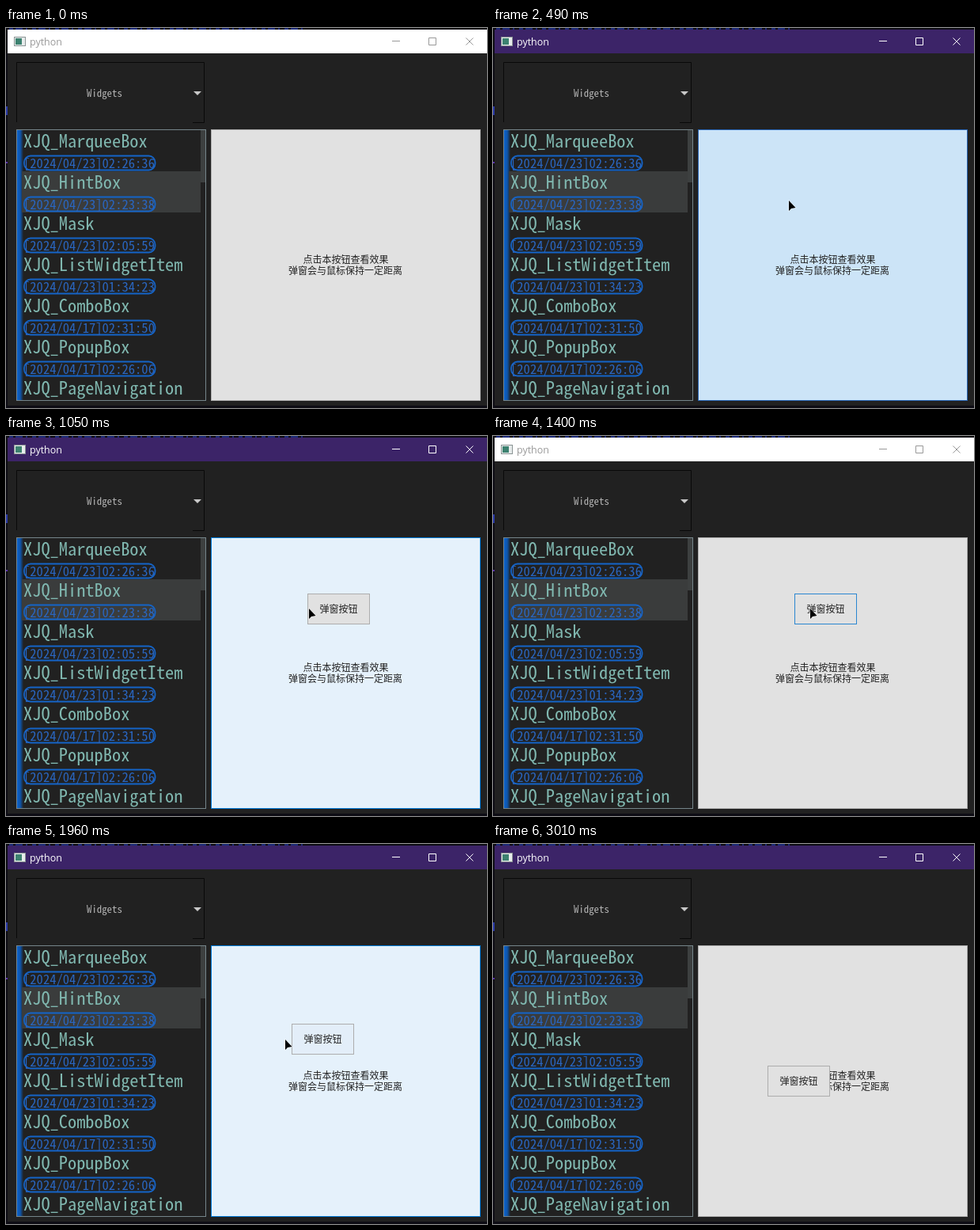
Recreate the animation shown at these times as an HTML page. Size 608x480 px, loop 3.08 s.

```html
<!DOCTYPE html>
<html lang="zh-CN">
<head>
<meta charset="utf-8">
<title>python</title>
<style>
html, body { margin: 0; width: 608px; height: 480px; overflow: hidden; background: #0d0c14; }
svg { display: block; }
/* half-width Latin: every glyph advances half an em */
.mono {
  font-family: "Noto Sans Mono CJK SC", "Liberation Mono", monospace;
  font-size-adjust: ch-width .5;
  white-space: pre;
}
.cjk { font: 12px "Noto Sans CJK SC", "Noto Sans CJK", sans-serif; text-anchor: middle; fill: #222; }
.title { font: 12.5px "Open Sans", sans-serif; }
.name { font-size: 22.4px; fill: #80b8b0; }
.date { font-size: 16.6px; fill: #2a66c0; }
</style>
</head>
<body>
<svg width="608" height="480" viewBox="0 0 608 480">
  <defs>
    <linearGradient id="strip">
      <stop offset="0" stop-color="#0c62cc"/>
      <stop offset=".5" stop-color="#0e56ac"/>
      <stop offset="1" stop-color="#212121"/>
    </linearGradient>
    <clipPath id="listClip"><path d="M14 129H252V470H14Z"/></clipPath>
  </defs>

  <!-- desktop showing past the window edges -->
  <path d="M4 1H375" stroke="#1c2a78" stroke-width="2" stroke-dasharray="5 3 9 4 2 6"/>
  <path d="M0 99H2V110H0Z" fill="#2a3aa8"/>
  <path d="M0 169H2V171H0Z" fill="#5a30b0"/>

  <!-- window -->
  <path d="M2 32H608V477H2Z" fill="#212121"/>
  <rect id="bar" x="2" y="2" width="606" height="30"/>
  <rect x="10.5" y="11.5" width="14" height="11" fill="#e8ecec" stroke="#8a9494"/>
  <rect x="12" y="13" width="8" height="8" fill="#3d8270"/>
  <text id="caption" class="title" x="30" y="22">python</text>
  <path id="controls" d="M488 16.5H498M534.5 12.5H543.5V21.5H534.5ZM581.5 12.5L590.5 21.5M590.5 12.5L581.5 21.5" fill="none"/>

  <!-- combo box -->
  <path d="M13.5 119V43.5H250.5V119.5H236" fill="none" stroke="#090909"/>
  <text class="mono" x="102" y="87" font-size="12.8" fill="#b4b4b4">Widgets</text>
  <path d="M237 80H247L242 85Z" fill="#c8c8c8"/>

  <!-- list -->
  <path d="M14 129H22V470H14Z" fill="url(#strip)"/>
  <path d="M20 181H246V233H20Z" fill="#3a3c3c"/>
  <path d="M246 129H252V195H246Z" fill="#3d4040"/>
  <g id="rows" clip-path="url(#listClip)"></g>
  <rect x="13.5" y="128.5" width="239" height="342" fill="none" stroke="#75858a"/>

  <!-- main button -->
  <rect id="panel" x="259.5" y="128.5" width="340" height="342"/>
  <text class="cjk" x="429.5" y="297">点击本按钮查看效果</text>
  <text class="cjk" x="429" y="311">弹窗会与鼠标保持一定距离</text>

  <g id="popup">
    <rect id="popupBox" x=".5" y=".5" width="78" height="38"/>
    <text class="cjk" x="39.5" y="24">弹窗按钮</text>
  </g>
  <path id="cursor" d="M1 1V14L4 11L9.5 10Z" stroke="#fff" stroke-opacity=".5" stroke-width="1.2" paint-order="stroke"/>
</svg>
<script>
const LOOP = 3080, TICK = 70;
const $ = id => document.getElementById(id);
const set = (id, attrs) => {
  for (const key in attrs) $(id).setAttribute(key, attrs[key]);
};

const items = [
  ["MarqueeBox", "23]02:26:36"], ["HintBox", "23]02:23:38"], ["Mask", "23]02:05:59"],
  ["ListWidgetItem", "23]01:34:23"], ["ComboBox", "17]02:31:50"],
  ["PopupBox", "17]02:26:06"], ["PageNavigation", "17]02:20:41"]
];
$("rows").innerHTML = items.map(([name, date], i) => `
  <g transform="translate(22 ${129 + 52 * i})">
    <text class="mono name" x="0" y="21.5">XJQ_${name}</text>
    <rect x="1" y="32.5" width="165.5" height="18" rx="8" fill="none" stroke="#1464c8" stroke-width="1.8"/>
    <text class="mono date" x="0" y="48">[2024/04/${date}</text>
  </g>`).join("");

const GRAY = "#e1e1e1", HOVER = "#e5f1fb", PRESS = "#cce4f7";
const borders = { [GRAY]: "#adadad", [HOVER]: "#0078d7", [PRESS]: "#2a66b4" };

// [time, value], each held until the next
const active = [[0, false], [420, true], [1260, false], [1680, true]];
const panelFill = [
  [0, GRAY], [280, HOVER], [420, PRESS], [840, HOVER], [1120, GRAY], [1540, HOVER],
  [1680, PRESS], [1820, HOVER], [2310, PRESS], [2450, HOVER], [2660, GRAY]
];

// [time, x, y], moving evenly between entries
const cursorPath = [
  [70, 150, 330], [350, 373, 217], [980, 373, 217], [1190, 400, 217], [1470, 400, 217],
  [1680, 352, 246], [2100, 352, 246], [2310, 339, 300], [2520, 339, 300],
  [2800, 116, 276], [2940, 64, 331]
];
const popupPaths = [
  [[560, 408, 199], [770, 381, 199], [1610, 381, 199]],
  [[1750, 388, 227], [1967, 360, 227], [2240, 360, 227]],
  [[2380, 374, 280], [2590, 347, 280], [LOOP, 347, 280]]
];

const held = (keys, t) => keys.findLast(k => k[0] <= t)[1];

function along(path, t) {
  const next = path.findIndex(k => k[0] >= t);
  if (next < 0 || t < path[0][0]) return null;
  const b = path[next], a = path[Math.max(0, next - 1)];
  const u = b === a ? 0 : (t - a[0]) / (b[0] - a[0]);
  return [1, 2].map(i => Math.round(a[i] + (b[i] - a[i]) * u));
}

function place(id, pos) {
  set(id, pos
    ? { visibility: "visible", transform: `translate(${pos})` }
    : { visibility: "hidden" });
}

function draw(now) {
  const t = Math.floor(now % LOOP / TICK) * TICK;
  const on = held(active, t), fill = held(panelFill, t);
  const ink = on ? "#fff" : "#999";
  set("bar", { fill: on ? "#3c2468" : "#fff" });
  set("caption", { fill: ink });
  set("controls", { stroke: ink });
  set("panel", { fill, stroke: borders[fill] });

  const over = t >= 1120 && t < 1540;
  const sliding = t >= 1750 && t < 2030;
  set("popupBox", {
    fill: sliding ? "#e3eef9" : GRAY,
    stroke: over ? "#2a86d0" : "#adadad"
  });
  place("popup", popupPaths.map(path => along(path, t)).find(Boolean));
  place("cursor", along(cursorPath, t));
  requestAnimationFrame(draw);
}
draw(0);
</script>
</body>
</html>
```
